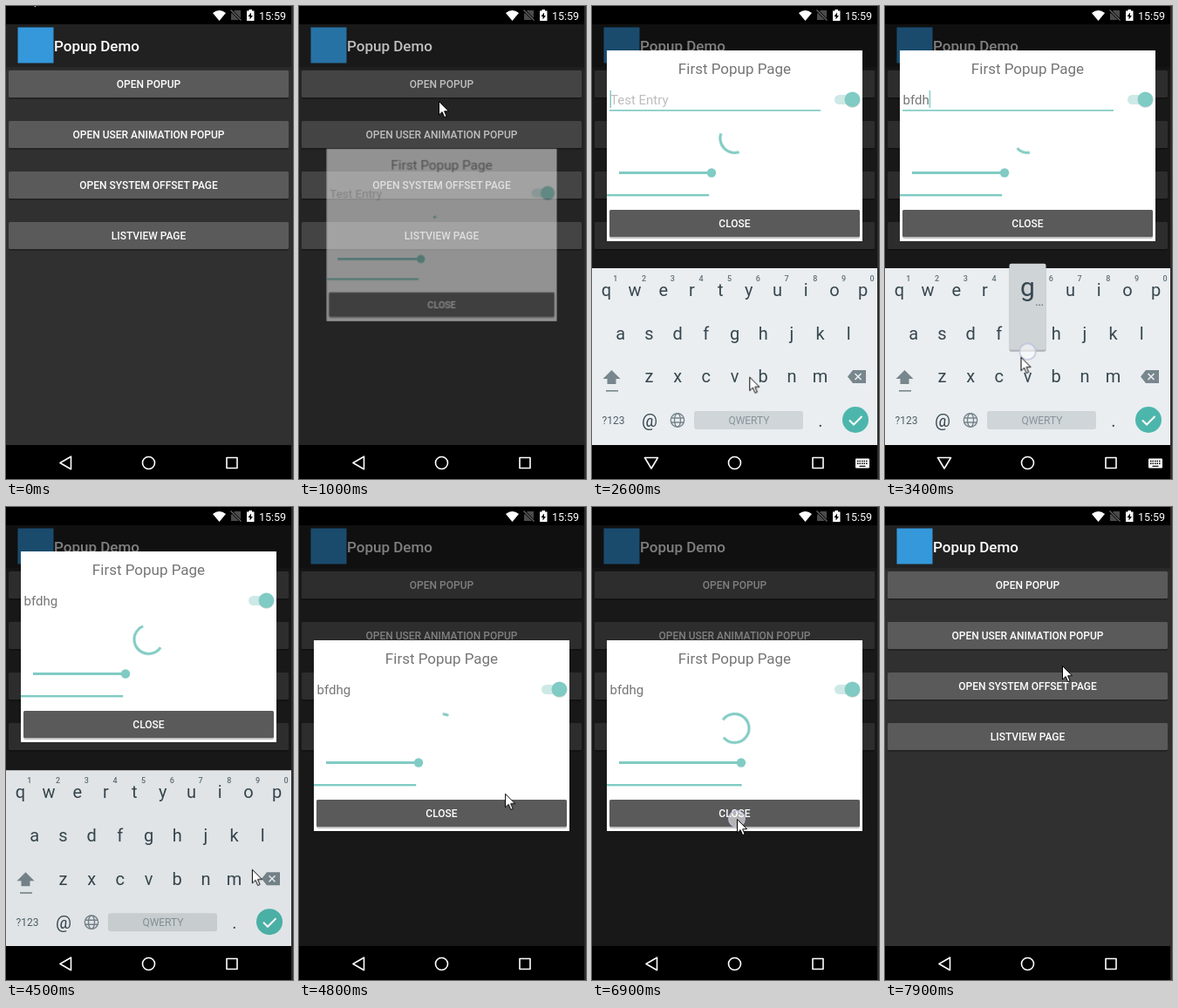
An HTML page for the animation above (8 s loop, 329 px wide and 543 px high).

```html
<!DOCTYPE html>
<html lang="en">
<head>
<meta charset="utf-8">
<title>Popup Demo</title>
<style>
html, body { margin: 0; width: 100%; height: 100%; overflow: hidden; background: #2d2d2d; }
svg { display: block; width: 329px; height: 543px; font-family: Roboto, "Open Sans", sans-serif; }
.btn { font-size: 12px; font-weight: 500; fill: #fff; text-anchor: middle; }
.mid { text-anchor: middle; }
.teal { fill: #80cbc4; }
.line { fill: none; stroke: #fff; stroke-width: 1.6; stroke-linejoin: round; }
#keys text { fill: #37474f; font-size: 20px; text-anchor: middle; }
#keys .hint { font-size: 9px; font-weight: 500; fill: #607078; }
#keys .small { font-size: 12px; fill: #4f5f67; }
#scaler { transform-origin: 163.5px 262.5px; }
#spin { transform-origin: 163.5px 254px; }
</style>
</head>
<body>
<svg viewBox="0 0 329 543">
  <rect width="327" height="543" fill="#303030"/>
  <rect y="70" width="327" height="3" opacity=".15"/>
  <rect y="21" width="327" height="49" fill="#212121"/>
  <rect x="13.5" y="24.5" width="41" height="41" fill="#3498db"/>
  <text x="55" y="52" font-size="17" font-weight="500" fill="#fff">Popup Demo</text>
  <g id="menu"></g>
  <rect id="openPress" x="3" y="74" width="321" height="31" rx="1.5" fill="#fff" fill-opacity=".15"/>
  <rect id="shade" y="21" width="327" height="483"/>

  <g id="lift"><g id="scaler">
    <rect x="17" y="153" width="293" height="219" fill="#fff"/>
    <text x="163.5" y="180" font-size="17" fill="#757575" class="mid">First Popup Page</text>
    <text id="holder" x="21" y="215" font-size="15" fill="#bdbdbd">Test Entry</text>
    <text id="typed" x="20.5" y="215" font-size="15" fill="#757575"></text>
    <g id="focus" class="teal">
      <rect x="20" y="221" width="242" height="1.7"/>
      <rect id="caret" x="20.5" y="199" width="1.5" height="20"/>
    </g>
    <rect x="278" y="204" width="28" height="11" rx="5.5" fill="#cde9e6"/>
    <circle cx="298.5" cy="210" r="9" opacity=".12"/>
    <circle cx="298.5" cy="209.3" r="8.8" class="teal"/>
    <circle id="spin" cx="163.5" cy="254" r="16.5" pathLength="360" fill="none" stroke="#80cbc4" stroke-width="3"/>
    <rect id="fill" x="31" y="292" height="3" class="teal"/>
    <circle id="thumb" cx="31" cy="293.5" r="5.2" class="teal"/>
    <rect id="bar" x="17" y="318" height="2.4" class="teal"/>
    <rect x="20" y="338" width="287" height="31" rx="2" opacity=".25"/>
    <rect x="20" y="336" width="287" height="31" rx="1.5" fill="#5a5a5a"/>
    <rect id="closePress" x="20" y="336" width="287" height="31" rx="1.5" fill="#fff" fill-opacity=".15"/>
    <text x="163.5" y="356" class="btn">CLOSE</text>
  </g></g>

  <g id="board">
    <rect y="301" width="327" height="203" fill="#eaeef1"/>
    <g id="keys">
      <path d="M22.5 418l10 10h-5v6h-10v-6h-5z" fill="#78868d"/>
      <rect x="16" y="441" width="14" height="1.6" fill="#78868d"/>
      <path d="M293 425.5l6-7.500h15v15h-15z" fill="#78868d"/>
      <path d="M301.5 422l7 7m0-7l-7 7" stroke="#eaeef1" stroke-width="1.6"/>
      <text x="24.5" y="480" class="small">?123</text>
      <text x="66" y="483">@</text>
      <g fill="none" stroke="#78868d" stroke-width="1.4">
        <circle cx="98" cy="475.5" r="7.7"/>
        <ellipse cx="98" cy="475.5" rx="3.5" ry="7.7"/>
        <path d="M91 473h14M91 478h14"/>
      </g>
      <rect x="117" y="465" width="125" height="21" rx="3" fill="#cfd5d8"/>
      <text x="180" y="480" class="small" style="fill:#89959b">QWERTY</text>
      <text x="262" y="483">.</text>
      <circle cx="302" cy="475" r="15" fill="#4db6ac"/>
      <path d="M295 475.5l5 5l9.5-9.500" fill="none" stroke="#fff" stroke-width="2"/>
    </g>
  </g>
  <g id="bubbles"></g>

  <rect width="327" height="21"/>
  <path d="M237 8q7.5-6 15 0l-7.500 9z" fill="#fff"/>
  <path d="M262 5h7v11h-11v-7z" fill="#4a4a4a"/>
  <path d="M257 4l13 13" stroke="#000" stroke-width="3"/>
  <path d="M257.5 4.5l12 12" stroke="#666" stroke-width="1.3"/>
  <path d="M276 5.5h2.5v-1.500h3.5v1.5h2.5v11.5h-8.500z" fill="#fff"/>
  <path d="M281 7.5l-3.500 4.5h2v3.5l3.5-4.500h-2z"/>
  <text x="290" y="15.5" font-size="12.5" fill="#fff">15:59</text>

  <rect y="504" width="327" height="39"/>
  <path id="back" class="line" d="M62 524.5l12.5-7.300v14.6z"/>
  <g id="down">
    <path class="line" d="M68 531l-7.500-12.500h15z"/>
    <rect x="302" y="519.5" width="16" height="11" rx="1" fill="#fff"/>
    <path d="M304 522.5h12M304 525.3h12" stroke="#000" stroke-width="1.5" stroke-dasharray="1.5 1"/>
    <path d="M306.5 528.3h7" stroke="#000" stroke-width="1.2"/>
  </g>
  <circle class="line" cx="163.5" cy="524.5" r="7"/>
  <rect class="line" x="253" y="518.5" width="12" height="12"/>

  <circle id="ring" r="9.3" fill="#fff" fill-opacity=".55" stroke="#b9bedb" stroke-width="1.3"/>
  <path id="mouse" d="M.5 .5V16l3.6-3.400l2.6 6l2.5-1l-2.600-5.800h5z" fill="#fff" stroke="#000"/>
</svg>
<script>
const LOOP = 8000;
const $ = id => document.getElementById(id);
const add = (id, html) => $(id).insertAdjacentHTML('beforeend', html);
const move = (x, y) => `translate(${x}px, ${y}px)`;

// stops: [ms, value] pairs
function track(id, prop, stops, easing = 'linear') {
  const all = [[0, stops[0][1]], ...stops, [LOOP, stops.at(-1)[1]]];
  $(id).animate(all.map(([t, v]) => ({ offset: t / LOOP, [prop]: v, easing })),
    { duration: LOOP, iterations: Infinity });
}
const jump = (id, prop, stops) => track(id, prop, stops, 'step-end');
const show = (id, ...spans) =>
  jump(id, 'opacity', [[0, 0], ...spans.flatMap(([a, b]) => [[a, 1], [b, 0]])]);
// Goes from off to on and back again
const swing = (id, prop, [a, b, c, d], off, on, easing) =>
  track(id, prop, [[a, off], [b, on], [c, on], [d, off]], easing);

// Main page buttons
['OPEN POPUP', 'OPEN USER ANIMATION POPUP', 'OPEN SYSTEM OFFSET PAGE', 'LISTVIEW PAGE'].forEach((label, i) => {
  const y = 74 + 58 * i;
  add('menu', `<rect x="3" y="${y + 2}" width="321" height="31" rx="2" opacity=".25"/>
    <rect x="3" y="${y}" width="321" height="31" rx="1.5" fill="#5a5a5a"/>
    <text x="163.5" y="${y + 20}" class="btn">${label}</text>`);
});

// Keyboard letters; the lower rows are indented by half and one and a half keys
const PITCH = 32.7;
const keyAt = {};
['qwertyuiop', 'asdfghjkl', 'zxcvbnm'].forEach((row, r) => {
  [...row].forEach((ch, i) => {
    const x = PITCH * (i + [.5, 1, 2][r]);
    const y = 333 + 49.7 * r;
    keyAt[ch] = [x, y];
    add('keys', `<text x="${x}" y="${y}">${ch}</text>`);
    if (!r) add('keys', `<text x="${x + 10.5}" y="315.5" class="hint">${(i + 1) % 10}</text>`);
  });
});

// Typing at an even pace
const strokes = [...'bfdhg'].map((ch, i) => {
  const start = 2660 + 180 * i;
  return { ch, start, end: start + 110, x: keyAt[ch][0], y: keyAt[ch][1] };
});
const caret = [[0, move(0, 0)]];
for (const { ch, start, end, x, y } of strokes) {
  add('bubbles', `<g id="pop-${ch}">
    <rect x="${x - 21}" y="${y - 85}" width="42" height="99" rx="2" opacity=".25"/>
    <rect x="${x - 21}" y="${y - 87}" width="42" height="99" rx="2" fill="#cfd4d7"/>
    <text x="${x}" y="${y - 50}" font-size="30" fill="#37474f" class="mid">${ch}</text>
    <text x="${x + 13.5}" y="${y - 39}" font-size="15" fill="#607078" class="mid">…</text></g>`);
  show('pop-' + ch, [start, end]);
  add('typed', `<tspan id="ch-${ch}">${ch}</tspan>`);
  jump('ch-' + ch, 'fillOpacity', [[0, 0], [end, 1]]);
  caret.push([end, move($('typed').getComputedTextLength(), 0)]);
}
jump('caret', 'transform', caret);
jump('holder', 'opacity', [[0, 1], [strokes[0].end, 0]]);
show('focus', [1780, 4200]);

// Popup opens, rises above the keyboard, drops and closes
const OUT = 'cubic-bezier(.39,.58,.57,1)';
const open = [870, 1270, 7150, 7550];
swing('shade', 'opacity', open, 0, .5, OUT);
swing('scaler', 'opacity', open, 0, 1, OUT);
swing('scaler', 'transform', open, 'scale(.8)', 'scale(1)', OUT);
jump('lift', 'transform', [[0, move(0, 0)], [2300, move(0, -102)], [4650, move(0, 0)]]);
show('openPress', [750, 950]);
show('closePress', [7000, 7150]);

const typing = [2250, 2420, 4493, 4690];
swing('board', 'opacity', typing, 0, 1);
swing('board', 'transform', typing, move(0, 30), move(0, 0));
show('down', [2250, 4450]);
show('back', [0, 2250], [4450, LOOP]);

// Spinner: the head runs ahead in the first half of a turn, the tail catches up in the second
const clamp = u => Math.min(1, Math.max(0, u));
const ease = u => u * u / (u * u + .3 * (1 - u) ** 2);
function arc(t) {
  const p = .622 + (t - 4500) / 1300;
  const f = p - Math.floor(p);
  const tail = ease(clamp(2 * f - 1));
  const head = ease(clamp(2 * f));
  return { from: 178 + 234 * p + 270 * (Math.floor(p) + tail), len: 10 + 275 * (head - tail) };
}
const ticks = Array.from({ length: LOOP / 50 + 1 }, (_, i) => i * 50);
track('spin', 'transform', ticks.map(t => [t, `rotate(${arc(t).from}deg)`]));
track('spin', 'strokeDasharray', ticks.map(t => [t, `${arc(t).len} ${360 - arc(t).len}`]));

// Slider drives the progress bar
const slide = [[5350, .4], [5700, .328], [5850, .328], [6250, .528]];
const follow = (id, prop, fn) => track(id, prop, slide.map(([t, v]) => [t, fn(v)]));
follow('thumb', 'transform', v => move(265 * v, 0));
follow('fill', 'width', v => 265 * v + 'px');
follow('bar', 'width', v => 293 * v + 'px');
swing('thumb', 'r', [5300, 5400, 6250, 6350], '5.2px', '7.5px');

// Pointer stops: arrive, leave, x, y and, for a tap, the ring's offset
const visits = [
  [200, 200, 26, -17],
  [750, 900, 165, 95, 0, 0],
  [1800, 2150, 120, 220, -5, -7.5],
  ...strokes.map(s => [s.start, s.end, s.x - 8, s.y + 20, 8, -6]),
  [3850, 4200, 291, 468, 7, 5],
  [4500, 4500, 282, 416],
  [4900, 4900, 221, 300],
  [5300, 5350, 137, 293],
  [5700, 5850, 113, 293],
  [6250, 6300, 171, 293],
  [6800, 7150, 166, 358, 0, 0],
  [7650, 7650, 171, 347],
  [7900, 7900, 203, 182],
];
const path = (id, k) => track(id, 'transform', visits.flatMap(([a, b, x, y, dx = 0, dy = 0]) =>
  [a, b].map(t => [t, move(x + k * dx, y + k * dy)])));
path('mouse', 0);
path('ring', 1);
const drag = [5300, 6300];
show('ring', ...[...visits.filter(v => v.length > 4), drag].sort((a, b) => a[0] - b[0]));
</script>
</body>
</html>
```
